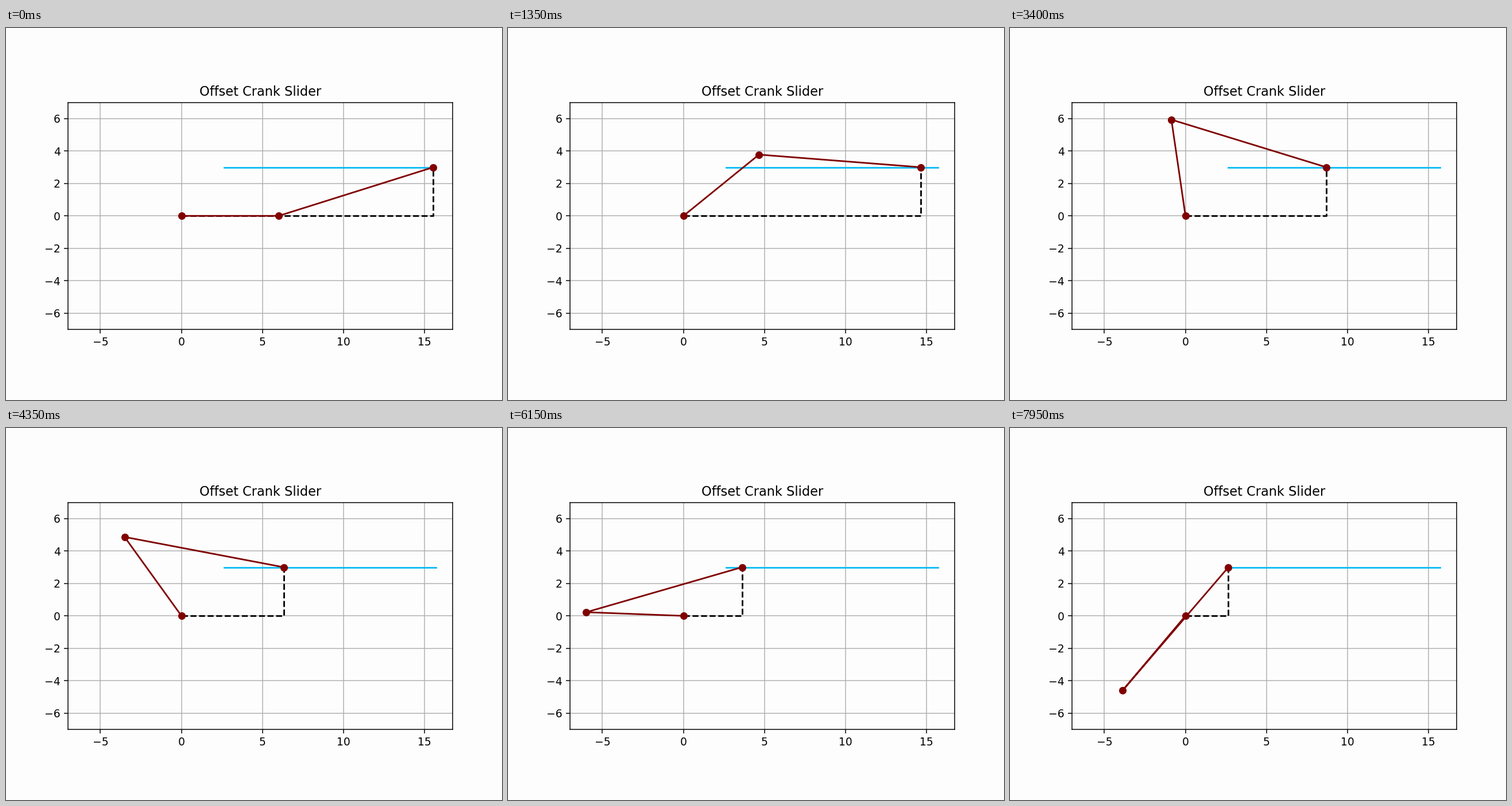
Write a matplotlib script that moves like this. It is 864x648 px and loops after 8 s.

```python
import numpy as np
import matplotlib.pyplot as plt
from matplotlib.animation import FuncAnimation

CRANK, ROD, OFFSET = 6, 10, 3
FRAMES, INTERVAL = 160, 50
STEP = 2 * np.pi / 249  # crank turn per frame

PAPER = "#fdfdfd"
LINK, TRACK = "maroon", "#0abcf5"

x_min = np.sqrt((ROD - CRANK) ** 2 - OFFSET ** 2)
x_max = np.sqrt((ROD + CRANK) ** 2 - OFFSET ** 2)

fig = plt.figure(figsize=(6.4, 4.8), dpi=135, facecolor=PAPER)
ax = fig.add_subplot(facecolor=PAPER)
ax.set_aspect("equal", adjustable="box")
ax.set_xlim(-7, x_max + 1)
ax.set_ylim(-7, 7)
ax.set_xticks(range(-5, 16, 5))
ax.set_yticks(range(-6, 7, 2))
ax.grid(True)
ax.set_title("Offset Crank Slider")

ax.plot([x_min, x_max], [OFFSET, OFFSET], color=TRACK)
guide, = ax.plot([], [], "k--")
linkage, = ax.plot([], [], "o-", color=LINK)


def update(i):
    angle = i * STEP
    px, py = CRANK * np.cos(angle), CRANK * np.sin(angle)
    slider = px + np.sqrt(ROD ** 2 - (py - OFFSET) ** 2)
    guide.set_data([0, slider, slider], [0, 0, OFFSET])
    linkage.set_data([0, px, slider], [0, py, OFFSET])
    return guide, linkage


anim = FuncAnimation(fig, update, frames=FRAMES, interval=INTERVAL,
                     repeat=True, repeat_delay=0)
plt.show()
```
